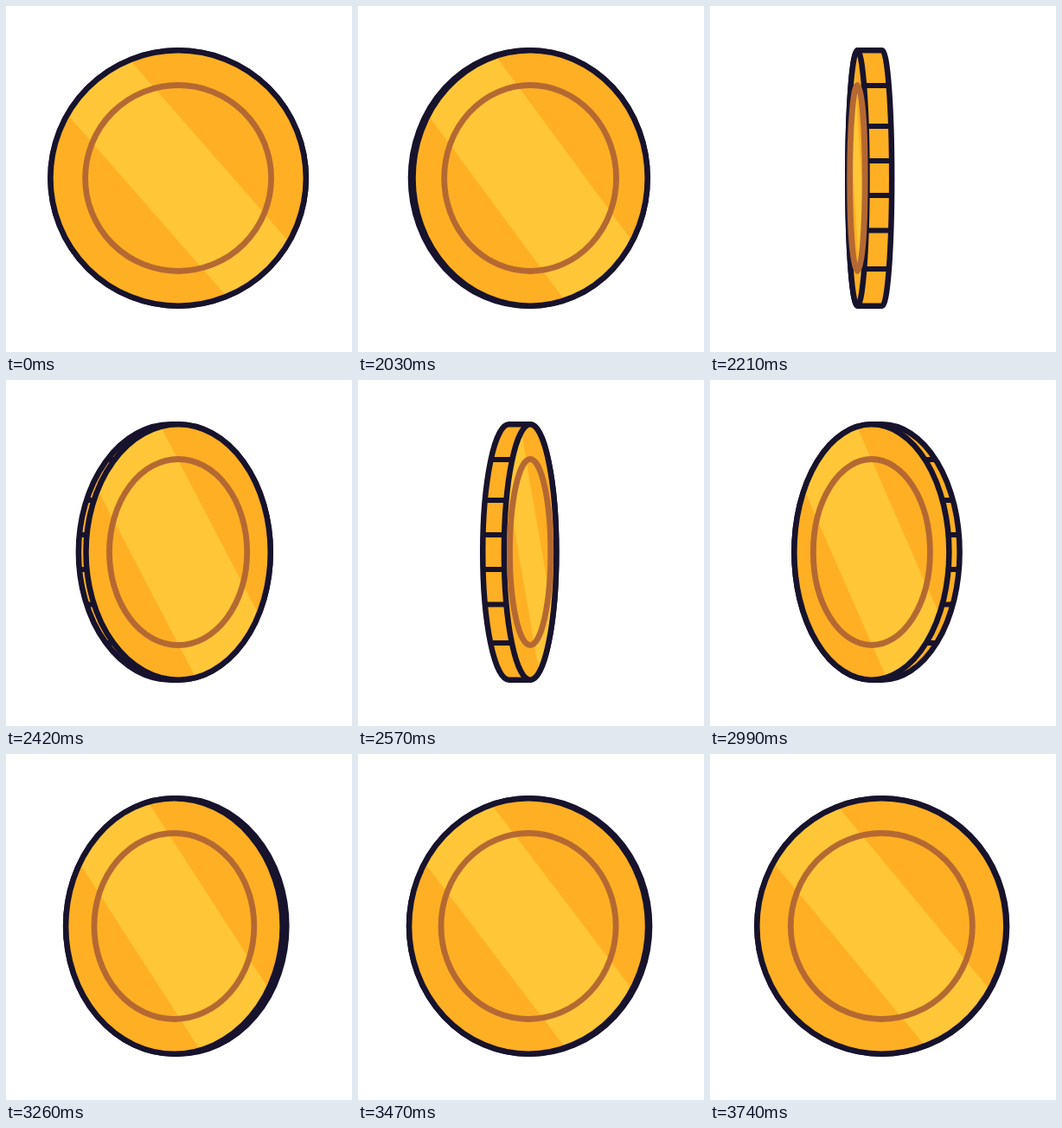
Recreate the animation shown at these times as an HTML page. Size 400 by 400 pixels, loop 3830 ms.

```html
<!DOCTYPE html>
<html lang="en">
<head>
<meta charset="utf-8">
<title>Spinning coin</title>
<style>
  html, body { margin: 0; width: 100%; height: 100%; overflow: hidden; background: #fff; }
  svg { display: block; width: 100vw; height: 100vh; }
  .ink { stroke: #17132d; stroke-width: 6.5; stroke-linejoin: round; }
  .gold { fill: #ffaf23; }
  .ring { fill: none; stroke: #b56932; stroke-width: 6.8; }
  #ribs { fill: none; stroke-width: 6; }
</style>
</head>
<body>
<svg viewBox="0 0 400 400">
  <clipPath id="faceClip"><ellipse class="face"/></clipPath>
  <path id="rim" class="ink gold"/>
  <path id="ribs" class="ink"/>
  <ellipse class="face gold"/>
  <polygon id="shine" fill="#ffc637" clip-path="url(#faceClip)"/>
  <ellipse class="face ink" fill="none"/>
  <ellipse id="ring" class="ring"/>
</svg>
<script>
const LOOP = 3830, SPIN_START = 2000, STEP = 30, LAST_STEP = 58;
const CX = 199.1, CY = 199, R = 147.7, RING = 107.5, DEPTH = 31;
const RIBS = [-107, -60, -20, 20, 60.5, 105];

// Spin keys: [step, quarter turns, quarter turns per step]
const KEYS = [
  [0, 0, .07], [1, .082, .09], [7, 1.075, .23], [14, 2.278, .122],
  [25, 3.222, .058], [36, 3.704, .028], [42, 3.848, .018], [58, 3.975, .003]
];

const $ = id => document.getElementById(id);
const faces = document.querySelectorAll('.face');

function quarterTurns(step) {
  const i = Math.max(1, KEYS.findIndex(k => k[0] >= step));
  const [t0, p0, v0] = KEYS[i - 1], [t1, p1, v1] = KEYS[i];
  const d = t1 - t0, u = (step - t0) / d, w = 1 - u;
  return p0 * w * w * (1 + 2 * u) + p1 * u * u * (3 - 2 * u)
    + d * u * w * (v0 * w - v1 * u);
}

function setEllipse(el, cx, rx, ry) {
  el.setAttribute('cx', cx);
  el.setAttribute('cy', CY);
  el.setAttribute('rx', rx);
  el.setAttribute('ry', ry);
}

function draw(ms) {
  const step = Math.min(LAST_STEP, Math.max(0, Math.floor((ms - SPIN_START) / STEP)));
  const turns = quarterTurns(step);
  const closing = Math.floor(turns) % 2 === 0;
  const part = turns % 1;
  const width = closing ? 1 - part : part;
  const narrow = 1 - width;
  const rx = R * width;
  const left = CX - DEPTH * narrow, right = CX;
  const face = closing ? right : left;

  $('rim').setAttribute('d',
    `M${left} ${CY - R}H${right}A${rx} ${R} 0 0 1 ${right} ${CY + R}` +
    `H${left}A${rx} ${R} 0 0 1 ${left} ${CY - R}Z`);

  const side = closing ? -1 : 1;
  $('ribs').setAttribute('d', RIBS.map(y => {
    const bulge = side * rx * Math.sqrt(1 - (y / R) ** 2);
    return `M${left + bulge} ${CY + y}H${right + bulge}`;
  }).join(''));

  // The ring narrows slightly later than the face
  faces.forEach(el => setEllipse(el, face, rx, R));
  setEllipse($('ring'), face, width * (RING + 10 * narrow), RING);

  // The shine band widens and steepens midway through a quarter turn
  const bend = width * width * narrow;
  const half = 63.7 + 90 * bend, lean = (.875 - 1.05 * bend) * R;
  const corner = (x, y) => `${face + x * width},${CY + y}`;
  $('shine').setAttribute('points', [
    corner(-half - lean, -R), corner(half - lean, -R),
    corner(half + lean, R), corner(-half + lean, R)
  ].join(' '));
}

const start = performance.now();
function tick() {
  draw((performance.now() - start) % LOOP);
  requestAnimationFrame(tick);
}
tick();
</script>
</body>
</html>
```
